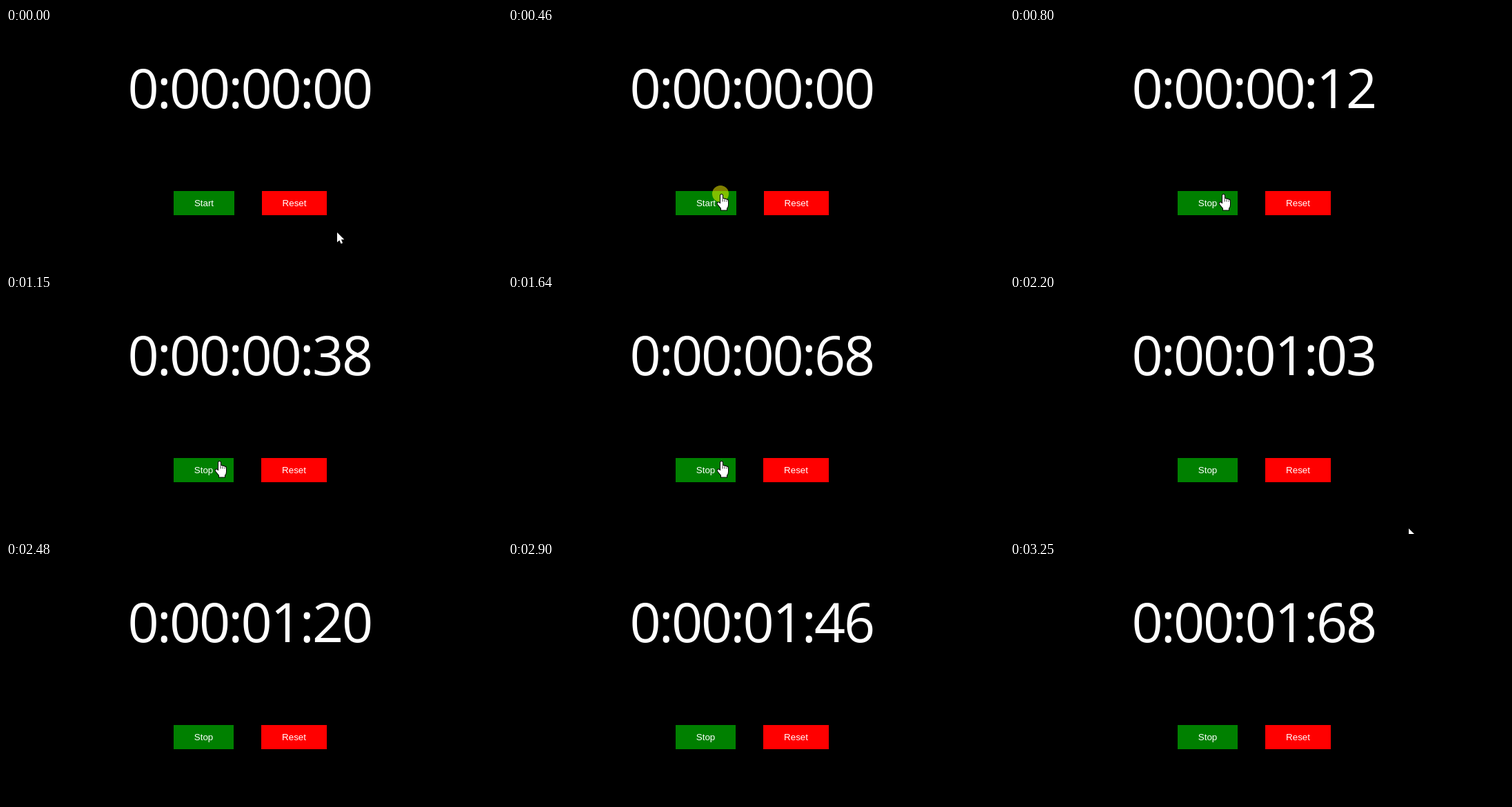
Write an HTML page with a canvas that moves like this. It is 719 px wide and 346 px high and loops after 3.32 s.

```html
<!DOCTYPE html>
<html lang="en">
<head>
<meta charset="utf-8">
<title>Stopwatch</title>
<style>
  html, body { margin: 0; width: 100%; height: 100%; overflow: hidden; background: #000; }
  canvas { display: block; }
</style>
</head>
<body>
<canvas id="stage" width="719" height="346"></canvas>
<script>
const ctx = document.getElementById('stage').getContext('2d');
const LOOP = 3320, STEP = 70;
const DIGIT = 43.1, COLON = 17.3;

const arrow = new Path2D('M0 0V14.2L3.3 11.2L5.6 16.3L8.1 15.2L5.9 10.3H10.3Z');
const hand = new Path2D('M-1 1Q.5 -1 2 1V6.5Q3.5 5.5 5 7Q6.5 6 8 7.8Q10 7 10 10V15Q10 18 8 20V22.5H0V20L-5 14Q-6 11.5 -3.5 11.5L-1 13.5Z');
const knuckles = new Path2D('M2 6.5V10.5M5 7.5V10.5M8 8.5V10.5');

// Cursor stops: time, x, y
const route = [
  [0, 480, 296], [400, 309, 241], [1660, 309, 241],
  [1990, 500, 334], [2200, 578, 338], [2270, 611, 341], [2340, 640, 352]
];

// The screen refreshes in steps, restarted at these moments
function snap(t) {
  const start = [1080, 600, 460, 0].find(s => t >= s);
  return start + Math.floor((t - start) / STEP) * STEP;
}

function cursorAt(t) {
  const i = route.findIndex(p => p[0] > t);
  if (i < 0) return route[route.length - 1].slice(1);
  const [t0, x0, y0] = route[i - 1], [t1, x1, y1] = route[i];
  let k = (t - t0) / (t1 - t0);
  if (i === 1) k = k * k * (3 - 2 * k);
  return [x0 + (x1 - x0) * k, y0 + (y1 - y0) * k];
}

function drawTime(n) {
  const text = `0:00:0${Math.floor(n / 100)}:${String(n % 100).padStart(2, '0')}`;
  ctx.font = '79px "Open Sans", "Noto Sans", sans-serif';
  ctx.textAlign = 'center';
  ctx.fillStyle = '#fff';
  let x = 177.6;
  for (const c of text) {
    const w = c === ':' ? COLON : DIGIT;
    ctx.fillText(c, x + w / 2, 116);
    x += w;
  }
}

function drawButton(label, color, left, right) {
  ctx.fillStyle = color;
  ctx.fillRect(left, 236, right - left, 35);
  ctx.font = '13.333px "Liberation Sans", Arial, sans-serif';
  ctx.textAlign = 'center';
  ctx.fillStyle = '#fff';
  ctx.fillText(label, (left + right) / 2, 258);
}

function drawCursor(x, y, over) {
  ctx.save();
  ctx.translate(x, y);
  ctx.fillStyle = '#fff';
  ctx.strokeStyle = '#000';
  ctx.lineWidth = 2;
  const shape = over ? hand : arrow;
  ctx.stroke(shape);
  ctx.fill(shape);
  if (over) {
    ctx.lineWidth = 0.8;
    ctx.stroke(knuckles);
  }
  ctx.restore();
}

function draw(now) {
  const t = snap(now % LOOP);
  const running = t >= 600;
  const startEnd = running ? 330 : 331;
  const resetLeft = startEnd + 40;

  ctx.fillStyle = '#000';
  ctx.fillRect(0, 0, 719, 346);
  drawTime(running ? Math.floor((t - 535) * 0.0619) : 0);
  drawButton(running ? 'Stop' : 'Start', 'green', 243, startEnd);
  drawButton('Reset', 'red', resetLeft, 465);

  const [x, y] = cursorAt(t);
  if (t >= 460 && t < 600) {
    ctx.fillStyle = 'rgba(255, 255, 0, 0.5)';
    ctx.beginPath();
    ctx.arc(308, 240, 12, 0, Math.PI * 2);
    ctx.fill();
  }
  const over = y >= 236 && y < 271 &&
    (x >= 243 && x < startEnd || x >= resetLeft && x < 465);
  drawCursor(x, y, over);
  requestAnimationFrame(() => draw(performance.now()));
}

draw(0);
</script>
</body>
</html>
```
